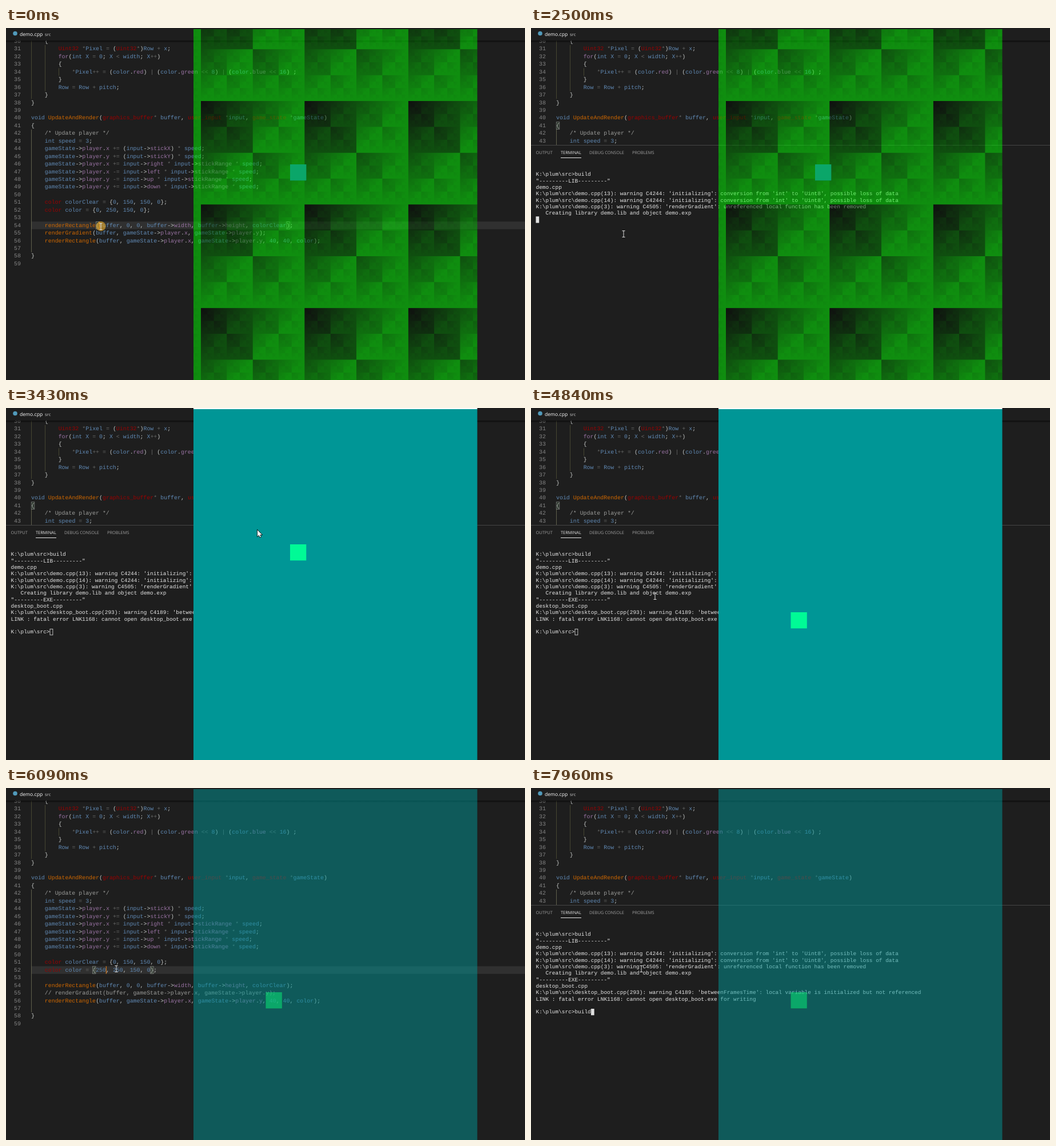
An HTML page with a canvas that plays this animation: 908 px wide and 617 px high, repeating every 8000 ms.

```html
<!DOCTYPE html>
<html lang="en">
<head>
<meta charset="utf-8">
<title>Live code editing</title>
<style>
  html, body { margin: 0; width: 100%; height: 100%; overflow: hidden; background: #1e1e1e; }
  canvas { display: block; }
</style>
</head>
<body>
<canvas id="stage" width="908" height="617"></canvas>
<script>
const ctx = document.getElementById('stage').getContext('2d');
const LOOP = 8000, TICK = 156.25;
const BG = '#1e1e1e', FG = '#c5c8c6';
const UI = '"Open Sans", "Noto Sans", sans-serif';
const MONO = '"Liberation Mono", monospace';

const FIRST_LINE = 30;
const CODE = String.raw`    {
        Uint32 *Pixel = (Uint32*)Row + x;
        for(int X = 0; X < width; X++)
        {
            *Pixel++ = (color.red) | (color.green << 8) | (color.blue << 16) ;
        }
        Row = Row + pitch;
    }
}

void UpdateAndRender(graphics_buffer* buffer, user_input *input, game_state *gameState)
{
    /* Update player */
    int speed = 3;
    gameState->player.x += (input->stickX) * speed;
    gameState->player.y += (input->stickY) * speed;
    gameState->player.x += input->right * input->stickRange * speed;
    gameState->player.x -= input->left * input->stickRange * speed;
    gameState->player.y -= input->up * input->stickRange * speed;
    gameState->player.y += input->down * input->stickRange * speed;

    color colorClear = {0, 150, 150, 0};
    color color = {0, 250, 150, 0};

    renderRectangle(buffer, 0, 0, buffer->width, buffer->height, colorClear);
    renderGradient(buffer, gameState->player.x, gameState->player.y);
    renderRectangle(buffer, gameState->player.x, gameState->player.y, 40, 40, color);

}
`.split('\n');

const PROMPT = String.raw`K:\plum\src>`;
const DIR = String.raw`K:\plum\src` + '\\';
const narrowing = n => `${DIR}demo.cpp(${n}): warning C4244: 'initializing': conversion from 'int' to 'Uint8', possible loss of data`;
const OUTPUT = [
  PROMPT + 'build',
  '"---------LIB---------"',
  'demo.cpp',
  narrowing(13),
  narrowing(14),
  `${DIR}demo.cpp(3): warning C4505: 'renderGradient': unreferenced local function has been removed`,
  '   Creating library demo.lib and object demo.exp',
  '"---------EXE---------"',
  'desktop_boot.cpp',
  `${DIR}desktop_boot.cpp(293): warning C4189: 'betweenFramesTime': local variable is initialized but not referenced`,
  'LINK : fatal error LNK1168: cannot open desktop_boot.exe for writing',
  ''
];

// Syntax groups, in the order of the capture groups below
const SYNTAX = new RegExp([
  /(\/\*.*\*\/|\/\/.*)/,
  /(Uint32|graphics_buffer|user_input|game_state|^ +color(?= c))/,
  /(\bfor\b|(?<=->|\.)\w+)/,
  /(\w+(?=\())/,
  /(\w+)/,
  /(->|[^\w\s+\-*=<>|]+)/,
  /([+\-*=<>|]+)/
].map(r => r.source).join('|'), 'g');
const COLORS = ['#9a9b99', '#9b0000', '#9872a2', '#ce6700', '#6089b4', FG, '#676867'];

const CODE_X = 44, CODE_W = 5.954, CODE_H = 13.445;
const TERM_X = 8.5, TERM_W = 5.674, TERM_H = 11.33;
const colX = col => CODE_X + col * CODE_W;
const rowY = line => 30 + (line - 31) * CODE_H;

function rect(x, y, w, h, color) {
  ctx.fillStyle = color;
  ctx.fillRect(x, y, w, h);
}

function text(str, x, y, size, family, color) {
  ctx.font = `${size}px ${family}`;
  ctx.fillStyle = color;
  ctx.fillText(str, x, y);
}

// Piecewise linear path through [tick, x, y] points
function along(path, k) {
  const i = path.findIndex(p => p[0] > k);
  if (i < 0) return path.at(-1).slice(1);
  const [a, b] = [path[i - 1], path[i]], u = (k - a[0]) / (b[0] - a[0]);
  return [1, 2].map(n => a[n] + (b[n] - a[n]) * u);
}

const MOUSE = [[0, 166, 348], [2, 162, 361], [19, 162, 361], [22, 440, 214], [27, 440, 214], [31, 217, 330], [33, 193, 317]];
const PLAYER = [[0, 497, 239], [22, 497, 239], [29, 454.5, 358]];

function makeGradient() {
  const tile = document.createElement('canvas');
  tile.width = tile.height = 256;
  const c = tile.getContext('2d'), image = c.createImageData(256, 256);
  for (let i = 0; i < 65536; i++) {
    image.data[i * 4 + 1] = (i & 255) | (i >> 8);
    image.data[i * 4 + 3] = 255;
  }
  c.putImageData(image, 0, 0);
  const pattern = ctx.createPattern(tile, 'repeat');
  pattern.setTransform(new DOMMatrix([0.7085, 0, 0, 0.7085, 341, 128]));
  return pattern;
}
const gradient = makeGradient();

function editorState(k) {
  const lines = CODE.slice();
  const edit = (line, from, to) => lines[line - FIRST_LINE] = lines[line - FIRST_LINE].replace(from, to);
  const pair = (line, open, close) => {
    const s = lines[line - FIRST_LINE];
    return [[line, s.indexOf(open)], [line, s.lastIndexOf(close)]];
  };
  if (k >= 3) edit(55, 'render', '// render');
  if (k >= 34) {
    const red = k < 36 ? '0' : '250'.slice(0, k - 36);
    edit(52, '{0', '{' + red);
    return { lines, caret: [52, 19 + red.length], brackets: pair(52, '{', '}') };
  }
  if (k >= 3) return { lines, caret: [55, 22], brackets: [[41, 0], [58, 0]] };
  if (k >= 1) return { lines, caret: [55, 19], brackets: pair(55, '(', ')') };
  return { lines, caret: [54, 20], brackets: pair(54, '(', ')') };
}

function guide(col, from, to, color) {
  rect(Math.round(colX(col)), rowY(from), 0.8, (to - from + 1) * CODE_H, color);
}

function drawEditor(k) {
  const { lines, caret, brackets } = editorState(k);
  rect(CODE_X, rowY(caret[0]), 908, CODE_H, '#303030');
  guide(0, 30, 37, '#505037');
  guide(4, 31, 36, '#505037');
  guide(8, 34, 34, '#505037');
  guide(0, 42, 57, '#707057');

  for (const [line, col] of brackets) {
    rect(colX(col), rowY(line), CODE_W, CODE_H, 'rgba(0,100,0,.1)');
    ctx.strokeStyle = '#888';
    ctx.lineWidth = 0.8;
    ctx.strokeRect(colX(col) + 0.3, rowY(line) + 0.4, CODE_W - 0.5, CODE_H - 0.8);
  }
  lines.forEach((str, i) => {
    const y = rowY(FIRST_LINE + i) + 9.4;
    text(FIRST_LINE + i, 14, y, 9.923, MONO, '#858585');
    for (const m of str.matchAll(SYNTAX)) {
      const group = m.slice(1).findIndex(g => g !== undefined);
      text(m[0], colX(m.index), y, 9.923, MONO, COLORS[group]);
    }
  });
  rect(colX(caret[1]) - 0.3, rowY(caret[0]), 1.4, CODE_H, '#c07020');
}

function drawTabBar() {
  rect(0, 0, 908, 22, BG);
  const shadow = ctx.createLinearGradient(0, 22, 0, 26);
  shadow.addColorStop(0, 'rgba(0,0,0,.6)');
  shadow.addColorStop(1, 'rgba(0,0,0,0)');
  rect(0, 22, 908, 4, shadow);
  ctx.fillStyle = '#519aba';
  ctx.beginPath();
  ctx.arc(16, 9.5, 3.8, 0, 7);
  ctx.fill();
  text('demo.cpp', 24, 13.5, 8.6, UI, '#fff');
  text('src', 68, 13.5, 7.7, UI, '#ccc');
}

function terminalLines(k) {
  const typed = n => PROMPT + 'build'.slice(0, Math.max(0, n));
  if (k < 12) return [PROMPT];
  if (k < 16) return [typed([1, 2, 4, 5][k - 12])];
  if (k < 18) return [...OUTPUT.slice(0, 7), ''];
  if (k < 20) return [...OUTPUT.slice(0, 9), ''];
  return [...OUTPUT, typed(k < 47 ? Math.min(3, k - 42) : k < 49 ? 4 : 5)];
}

function drawPanel(k, focused) {
  rect(0, 205, 908, 412, BG);
  rect(0, 205, 908, 1, '#454545');
  [['OUTPUT', 8.5], ['TERMINAL', 52], ['DEBUG CONSOLE', 102], ['PROBLEMS', 177]].forEach(([name, x]) =>
    text(name, x, 220.8, 7.45, UI, name === 'TERMINAL' ? '#e7e7e7' : '#a0a0a0'));
  rect(52, 227, 36, 1, '#e7e7e7');

  const lines = terminalLines(k), last = lines.length - 1;
  lines.forEach((str, i) => text(str, TERM_X, 259.3 + i * TERM_H, 9.457, MONO, '#e5e5e5'));
  const x = TERM_X + lines[last].length * TERM_W, y = 251 + last * TERM_H;
  if (focused) return rect(x, y, TERM_W, TERM_H, '#e0e0e0');
  ctx.strokeStyle = '#e0e0e0';
  ctx.lineWidth = 0.8;
  ctx.strokeRect(x + 0.4, y + 0.4, TERM_W - 0.8, TERM_H - 0.8);
}

function drawGame(k, focused) {
  ctx.globalAlpha = focused ? 1 : 0.5;
  rect(328, 2, 496.5, 615, k < 18 ? gradient : 'rgb(0,150,150)');
  const [x, y] = along(PLAYER, k);
  // The window fades as one surface, so the square replaces what lies under it
  rect(x, y, 28.3, 28.3, focused ? '#00fa96' : BG);
  if (!focused) {
    ctx.globalAlpha = 1;
    rect(x, y, 28.3, 28.3, k < 18 ? '#118a5a' : '#0f8c5a');
  }
  ctx.globalAlpha = 1;
  if (focused) rect(328, 0, 496.5, 2, '#fff');
}

// Code glimpsed through the square while the window is translucent
function drawCodeUnderPlayer(k) {
  const [x, y] = along(PLAYER, k);
  ctx.save();
  ctx.beginPath();
  ctx.rect(x, y, 28.3, 28.3);
  ctx.clip();
  ctx.globalAlpha = 0.5;
  if (panelOpen(k)) drawPanel(k, true);
  else {
    rect(x, y, 28.3, 28.3, BG);
    drawEditor(k);
  }
  rect(x, y, 0, 0, BG);
  ctx.restore();
}

function drawMouse(k) {
  const [x, y] = along(MOUSE, k);
  if (k < 2) {
    ctx.fillStyle = `rgba(225,165,40,${0.65 - k * 0.35})`;
    ctx.beginPath();
    ctx.arc(x, y - 0.5, 8.5, 0, 7);
    ctx.fill();
  }
  ctx.save();
  ctx.translate(x, y);
  if (x > 328) {
    const arrow = new Path2D('M0 0V11L2.5 8.7L4.3 12.5L6 11.7L4.3 8H7.7Z');
    ctx.strokeStyle = '#000';
    ctx.lineWidth = 1.4;
    ctx.stroke(arrow);
    ctx.fillStyle = '#fff';
    ctx.fill(arrow);
  } else {
    ctx.strokeStyle = '#ddd';
    ctx.lineWidth = 1;
    ctx.stroke(new Path2D('M-2.5 -5.5H2.5M0 -5.5V5.5M-2.5 5.5H2.5'));
  }
  ctx.restore();
}

const panelOpen = k => k >= 8 && k < 34 || k >= 42;

function draw(now) {
  const k = Math.min(51, Math.floor((now % LOOP + 9) / TICK));
  const gameFocused = k >= 21 && k < 33;
  ctx.textRendering = 'geometricPrecision';
  rect(0, 0, 908, 617, BG);
  drawEditor(k);
  drawTabBar();
  if (panelOpen(k)) drawPanel(k, !gameFocused);
  drawGame(k, gameFocused);
  if (!gameFocused) {
    drawCodeUnderPlayer(k);
    const [x, y] = along(PLAYER, k);
    ctx.globalAlpha = 0.5;
    rect(x, y, 28.3, 28.3, '#00fa96');
    ctx.globalAlpha = 1;
  }
  drawMouse(k);
  requestAnimationFrame(draw);
}
requestAnimationFrame(draw);
</script>
</body>
</html>
```
